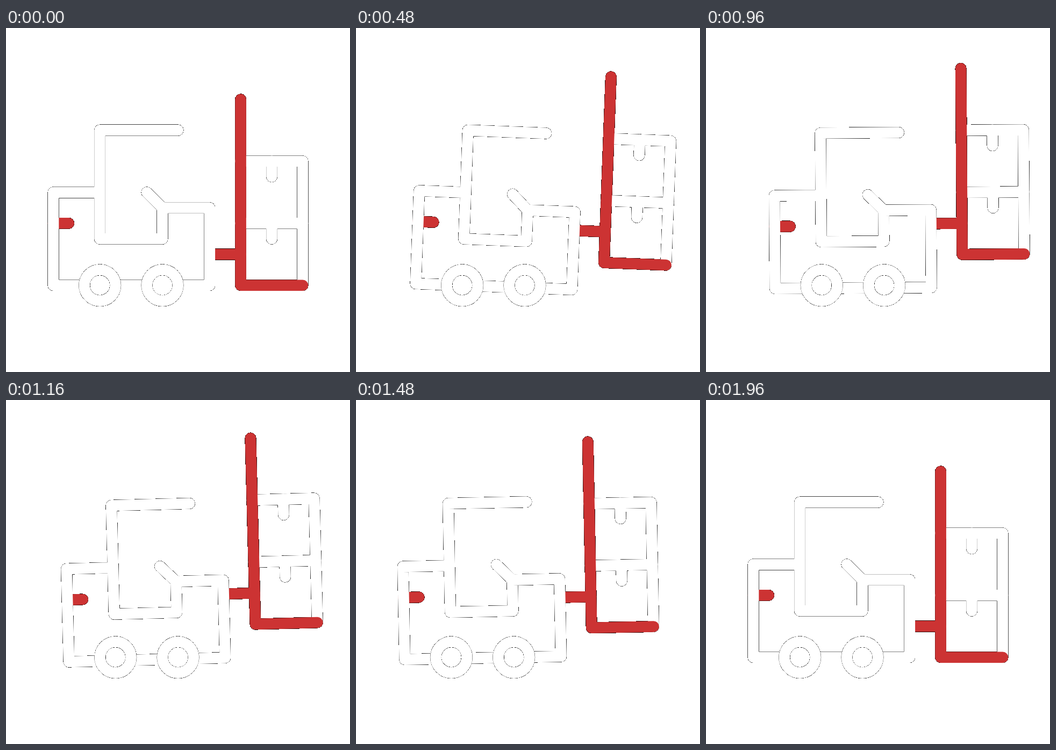
Recreate the animation shown at these times as an HTML page with a canvas. Size 640 px wide and 640 px high, loop 2 s.

```html
<!DOCTYPE html>
<html lang="en">
<head>
<meta charset="utf-8">
<title>Forklift</title>
<style>
  html, body { margin: 0; width: 100%; height: 100%; overflow: hidden; background: #fff; }
  canvas { display: block; width: 640px; height: 640px; }
</style>
</head>
<body>
<canvas id="stage" width="640" height="640"></canvas>
<script>
const SIZE = 640, LOOP = 2000, STEP = 40;
const RED = '#cc3333', WHITE = '#fff';
const LINE = 20.6, GROUND = 478.7, PIVOT = 233;
const ctx = document.getElementById('stage').getContext('2d', { willReadFrequently: true });

// Tables of [time, value]
const DRIVE = [[0, 0], [85, 0], [840, 42], [1640, 0], [2000, 0]];
const LIFT = [[0, 0], [28, 0], [663, -61], [1297, -61], [1932, 0], [2000, 0]];
const SINK = [[0, 0], [28, 0], [980, 5], [1760, 0], [2000, 0]];
const TILT = [[0, 0], [160, 0.25], [320, 1.12], [520, 2.4], [640, 2.9], [720, 2.8],
  [960, -0.42], [1160, -1.5], [1320, -1.9], [1640, -0.25], [1760, 0], [2000, 0]];

const BODY = [[174.5, 305.9], [88, 305.9], [88, GROUND], [378.8, GROUND], [378.8, 334.5],
  [291, 334.5], [291, 392.2], [174.5, 392.2], [174.5, 190.1], [320, 190.1]];
const LEVER = [[291, 334.5], [262, 305.7]];
const LAMP = [[88, 363.3], [116.7, 363.3]];
const MAST = [[436.6, 132.7], [436.6, GROUND], [552, GROUND]];
const LINK = [[382, 421], [436.6, 421]];
const CRATES = [
  [[436.6, 247.8], [552, 247.8], [552, GROUND]],
  [[436.6, 363.2], [552, 363.2]],
  [[494.5, 247.8], [494.5, 276.6]],
  [[494.5, 363.2], [494.5, 392.2]]
];

// Symmetric ease, same curve as cubic-bezier(.5, 0, .5, 1)
function ease(x) {
  let lo = 0, hi = 1;
  for (let i = 0; i < 24; i++) {
    const u = (lo + hi) / 2;
    if (1.5 * u * (1 - u) + u ** 3 < x) lo = u; else hi = u;
  }
  return lo * lo * (3 - 2 * lo);
}

function segment(keys, t) {
  let i = 0;
  while (i < keys.length - 2 && t >= keys[i + 1][0]) i++;
  return i;
}

function eased(keys, t) {
  const i = segment(keys, t);
  const [t0, a] = keys[i], [t1, b] = keys[i + 1];
  return a + (b - a) * ease((t - t0) / (t1 - t0));
}

function spline(keys, t) {
  const i = segment(keys, t);
  const slope = k => k < 1 || k > keys.length - 2 ? 0
    : (keys[k + 1][1] - keys[k - 1][1]) / (keys[k + 1][0] - keys[k - 1][0]);
  const [t0, a] = keys[i], [t1, b] = keys[i + 1];
  const d = t1 - t0, f = (t - t0) / d, g = 1 - f;
  return a * g * g * (1 + 2 * f) + b * f * f * (3 - 2 * f)
    + d * f * g * (slope(i) * g - slope(i + 1) * f);
}

function stroke(points, color) {
  ctx.strokeStyle = color;
  ctx.beginPath();
  points.forEach(p => ctx.lineTo(...p));
  ctx.stroke();
}

function circle(x, r) {
  ctx.beginPath();
  ctx.arc(x, GROUND, r, 0, 2 * Math.PI);
}

function wheel(x) {
  ctx.globalCompositeOperation = 'destination-out';
  circle(x, 39.5);
  ctx.fill();
  ctx.globalCompositeOperation = 'source-over';
  ctx.strokeStyle = WHITE;
  circle(x, 28.9);
  ctx.stroke();
}

// Soft edges are laid on black, which gives the hairline contour
function darkenEdges() {
  const image = ctx.getImageData(0, 0, SIZE, SIZE), px = image.data;
  for (let i = 0; i < px.length; i += 4) {
    const a = px[i + 3] / 255;
    if (a === 0 || a === 1) continue;
    if (a < 0.12) { px[i + 3] = 0; continue; }
    for (let c = 0; c < 3; c++) px[i + c] *= a;
    px[i + 3] = 255;
  }
  ctx.putImageData(image, 0, 0);
}

function draw(t) {
  const drive = eased(DRIVE, t);
  ctx.clearRect(0, 0, SIZE, SIZE);
  ctx.lineWidth = LINE;
  ctx.lineCap = ctx.lineJoin = 'round';

  ctx.save();
  ctx.translate(PIVOT + drive, GROUND + eased(SINK, t));
  ctx.rotate(spline(TILT, t) * Math.PI / 180);
  ctx.translate(-PIVOT, -GROUND);

  ctx.save();
  ctx.translate(0, eased(LIFT, t));
  CRATES.forEach(c => stroke(c, WHITE));
  stroke(LINK, RED);
  stroke(MAST, RED);
  ctx.restore();

  stroke(LAMP, RED);
  stroke(BODY, WHITE);
  stroke(LEVER, WHITE);
  ctx.restore();

  wheel(174.7 + drive);
  wheel(291 + drive);
  darkenEdges();
}

const start = performance.now();
let shown = -1;
function tick() {
  const now = Math.max(0, performance.now() - start) % LOOP;
  const t = now < 2 * STEP ? 0 : Math.floor(now / STEP) * STEP;
  if (t !== shown) draw(shown = t);
  requestAnimationFrame(tick);
}
tick();
</script>
</body>
</html>
```
